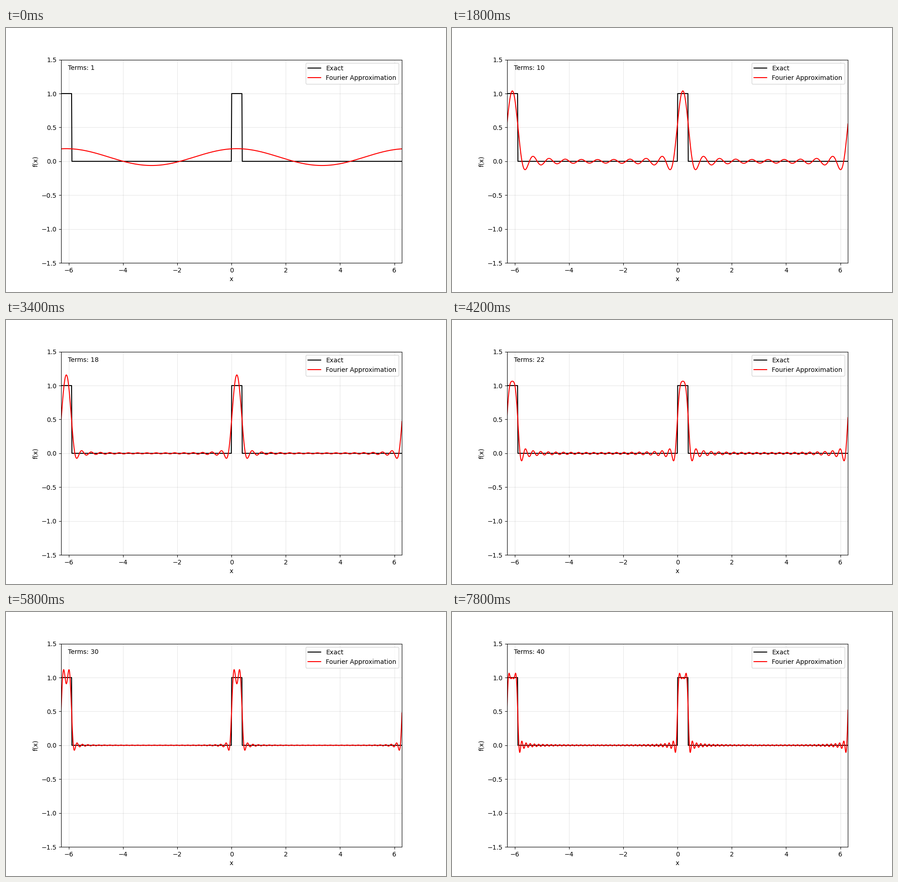
Animation of 966x580 px, one loop 8000 ms. Source, as a matplotlib script:

```python
import numpy as np
import matplotlib.pyplot as plt
from matplotlib.animation import FuncAnimation

TERMS = 40
WIDTH = np.pi / 8  # pulse width within a period of 2*pi

x = np.linspace(-2 * np.pi, 2 * np.pi, 1000)
exact = np.where((x < WIDTH - 2 * np.pi) | ((x >= 0) & (x < WIDTH)), 1.0, 0.0)


def fourier(count):
    n = np.arange(1, count + 1)[:, None]
    a = np.sin(n * WIDTH) / (n * np.pi)
    b = (1 - np.cos(n * WIDTH)) / (n * np.pi)
    return WIDTH / (2 * np.pi) + (a * np.cos(n * x) + b * np.sin(n * x)).sum(axis=0)


fig, ax = plt.subplots(figsize=(9.66, 5.8), dpi=100)
ax.plot(x, exact, color="black", label="Exact")
(approx,) = ax.plot(x, fourier(1), color="red", label="Fourier Approximation")
ax.set_xlim(-2 * np.pi, 2 * np.pi)
ax.set_ylim(-1.5, 1.5)
ax.set_xlabel("x")
ax.set_ylabel("f(x)")
ax.grid(alpha=0.3)
ax.legend(loc="upper right")
counter = ax.text(0.02, 0.95, "Terms: 1", transform=ax.transAxes)


def update(frame):
    count = frame + 1
    approx.set_ydata(fourier(count))
    counter.set_text(f"Terms: {count}")
    return approx, counter


anim = FuncAnimation(fig, update, frames=TERMS, interval=200, repeat=True)
plt.show()
```
